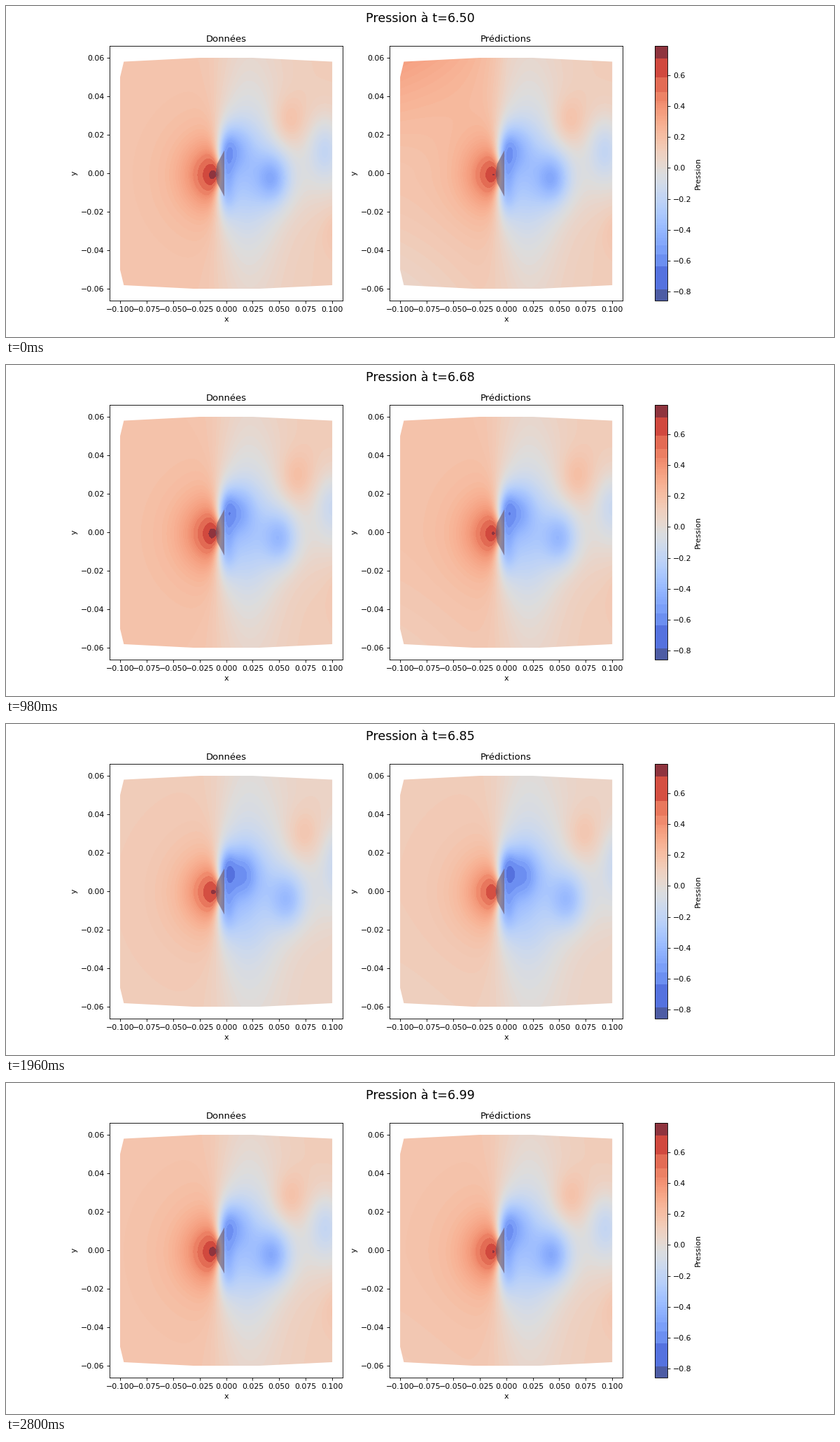
These frames come from a looping animation (1183x473 px, 2940 ms). A matplotlib script:

```python
import numpy as np
import matplotlib.pyplot as plt
from matplotlib.animation import FuncAnimation
from matplotlib.cm import ScalarMappable
from matplotlib.colors import ListedColormap, Normalize, to_rgb
from matplotlib.patches import Polygon

W, H, DPI = 1183, 473, 78.875
FRAMES, STEP_MS = 21, 140
START, END, DT = 6.5, 6.99, 0.025
PERIOD = 0.163  # vortex shedding period
LOW, HIGH = -0.859, 0.788

plt.rcParams["font.family"] = "DejaVu Sans"
norm = Normalize(LOW, HIGH)
coolwarm = plt.get_cmap("coolwarm")
x, y = np.meshgrid(np.linspace(-0.1, 0.1, 304), np.linspace(-0.06, 0.06, 332))


def bump(cx, cy, sx, sy):
    return np.exp(-((x - cx) / sx) ** 2 - ((y - cy) / sy) ** 2)


def step(v):
    return 1 / (1 + np.exp(-np.clip(v, -50, 50)))


def cycle(t):
    return (t - START) / PERIOD % 1


def surge(phase):
    """Mean pressure pulse, twice per shedding cycle, from 0 to 1."""
    return np.cos(np.pi * (2 * phase - 0.09)) ** 6


def banded_cmap(level):
    """Coolwarm with fine steps in the middle and wide bands at both ends."""
    cold = np.array([-0.79, -0.64, -0.56, -0.50])
    warm = np.array([0.38, 0.44, 0.53]) + 0.07 * level
    fine = np.arange(cold[-1] + 0.03, warm[0] - 0.01, 0.0165)
    edges = np.concatenate([[LOW], cold, fine, warm, [0.71, HIGH]])
    colors = coolwarm(norm((edges[:-1] + edges[1:]) / 2))[:, :3]
    colors[0] = to_rgb("#4d5ca4")
    colors[-1] = to_rgb("#8f343e")
    values = np.linspace(LOW, HIGH, 412)
    index = np.clip(np.digitize(values, edges) - 1, 0, len(colors) - 1)
    return ListedColormap(colors[index])


def vortex(age, side):
    """Low core drifting downstream with a high patch on the other side."""
    s, old = age + 0.42, max(age, 0)
    cx = 0.05 * (s + np.hypot(s, 0.2))
    cy = np.hypot(0.003, 0.026 * max(age, -0.5))
    low = 0.29 * step((age + 0.6) / 0.1) * np.exp(-0.6 * old)
    high = 0.14 * step((age + 0.3) / 0.06) * np.exp(-1.2 * old)
    core = bump(cx, side * cy, 0.015 + 0.003 * old, 0.0125 + 0.008 * old)
    patch = bump(cx + 0.014, -side * 0.03 * step((age + 0.23) / 0.12), 0.016, 0.013)
    return high * patch - low * core


def pressure(t, peak=0.64):
    phase = cycle(t)
    base = 0.1 + 0.08 * surge(phase)
    swing = np.sin(2 * np.pi * (phase + 0.03))
    cy = -0.001 * np.cos(2 * np.pi * phase)

    r = np.hypot(np.minimum(x + 0.012, 0) / 0.022, (y - cy) / 0.0135)
    front = base + peak * np.exp(-r ** 1.15)

    wake = base - 0.05 - 0.17 * bump(0.02, 0, 0.034, 0.075)
    wake -= 0.25 * bump(0.016, 0, 0.036, 0.027)
    wake -= 0.10 * np.exp(-(y / 0.022) ** 2) * step((x - 0.04) / 0.01)
    wake -= 0.22 * bump(-0.001, 0, 0.009, 0.018)
    for side in (1, -1):
        tip = 0.07 + 0.14 * max(side * swing, 0)
        wake -= tip * bump(0, side * 0.013, 0.008, 0.009)
        age = (phase + (0.5 if side > 0 else 0)) % 1
        wake += vortex(age, side) + vortex(age - 1, side)

    # The jump lies inside the body and fans out above and below it.
    jump = -0.0095 + 0.0035 * np.exp(-(y / 0.008) ** 2)
    mix = step((x - jump) / (0.0013 + 0.13 * abs(y)))
    return front * (1 - mix) + wake * mix


def error(k, t):
    """Prediction error at the inflow corners, fading over the run."""
    left = np.clip(-x / 0.1, 0, 1)
    top = 0.2 * np.exp(-k / 2) * left ** 0.7 * np.clip(y / 0.06, 0, 1) ** 1.5
    wobble = 0.12 * np.cos(2 * np.pi * cycle(t)) * np.exp(-k / 15)
    return top - wobble * left * np.clip(-y / 0.06, 0, 1) ** 1.5


fig, axes = plt.subplots(1, 2, figsize=((W + 0.001) / DPI, (H + 0.001) / DPI), dpi=DPI,
                         gridspec_kw={"top": 415.5 / H})
heading = fig.suptitle("", fontsize=16)
scale = ScalarMappable(norm, banded_cmap(0))
fig.colorbar(scale, ax=list(axes), label="Pression", ticks=np.arange(-0.8, 0.7, 0.2))

half = [(-0.1, 0.05), (-0.0965, 0.058), (-0.025, 0.06), (0.025, 0.06), (0.1, 0.058)]
domain = half + [(px, -py) for px, py in reversed(half)]
body = [(-0.0017, 0.012), (-0.0085, 0.005), (-0.010, 0), (-0.0085, -0.005), (-0.0017, -0.012)]

images = []
for ax, name in zip(axes, ("Données", "Prédictions")):
    im = ax.imshow(np.zeros_like(x), extent=(-0.1, 0.1, -0.06, 0.06), origin="lower",
                   aspect="auto", interpolation="bilinear", norm=norm, cmap=scale.cmap)
    im.set_clip_path(Polygon(domain, transform=ax.transData))
    ax.add_patch(Polygon(body, facecolor="#70596c", alpha=0.65, lw=0))
    ax.set(title=name, xlabel="x", ylabel="y", xlim=(-0.11, 0.11), ylim=(-0.066, 0.066),
           xticks=np.linspace(-0.1, 0.1, 9), yticks=np.linspace(-0.06, 0.06, 7))
    images.append(im)


def update(k):
    t = min(START + DT * k, END)
    heading.set_text(f"Pression à t={t + 1e-4:.2f}")
    cmap = banded_cmap(surge(cycle(t)))
    scale.set_cmap(cmap)
    images[0].set_data(pressure(t))
    images[1].set_data(pressure(t, 0.57) + error(k, t))
    for im in images:
        im.set_cmap(cmap)
    return [heading, *images]


anim = FuncAnimation(fig, update, frames=FRAMES, interval=STEP_MS, repeat=True,
                     repeat_delay=0, blit=False)
plt.show()
```
